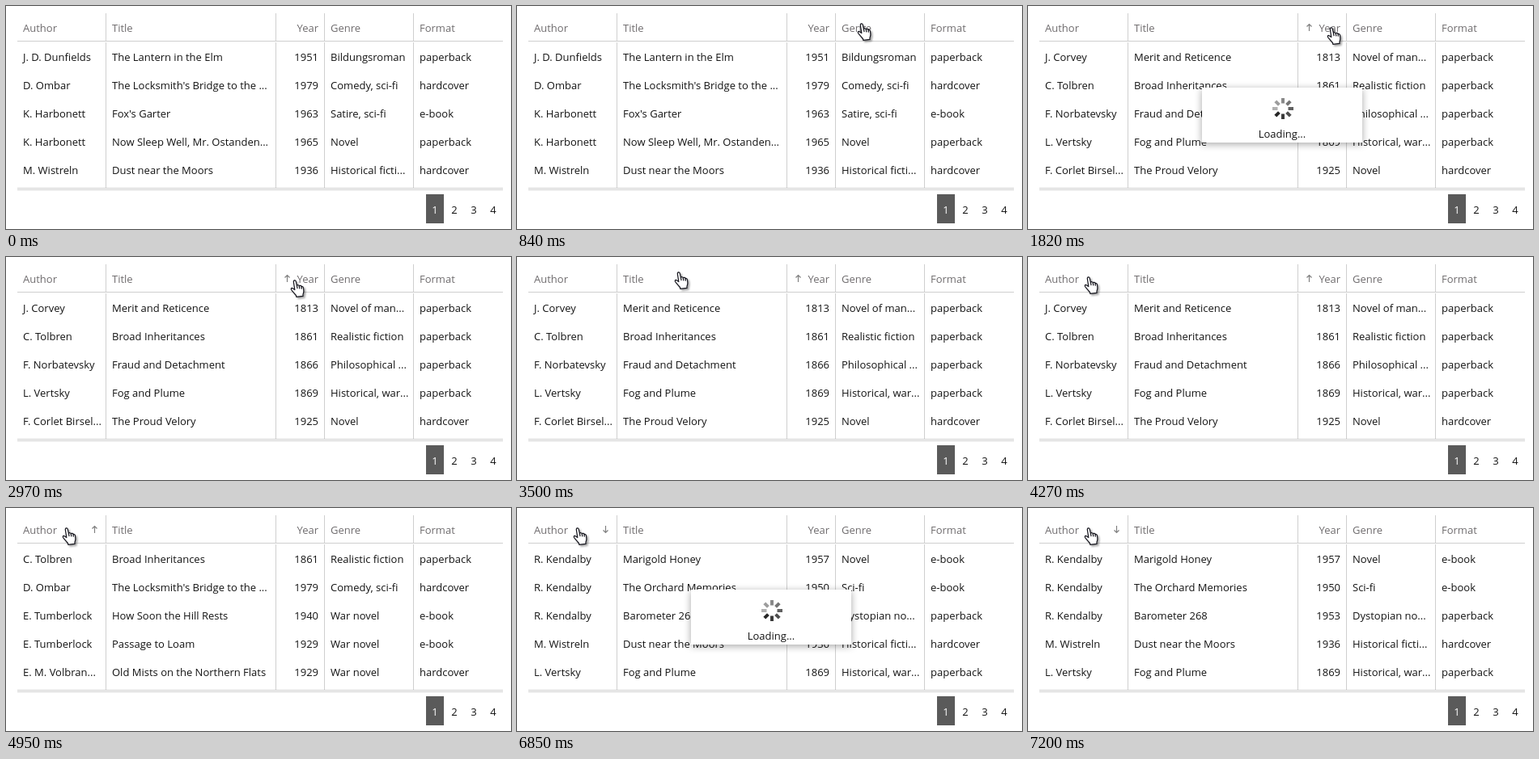
Animation, 624 px wide and 276 px high, one loop 8 s. Source, as an HTML page:

```html
<!DOCTYPE html>
<html lang="en">
<head>
<meta charset="utf-8">
<title>Sortable book grid</title>
<style>
html, body { margin: 0; width: 100%; height: 100%; overflow: hidden; background: #fff; }
svg { display: block; }
text { font: 13px "Open Sans", "Noto Sans", sans-serif; fill: #141414; }
.head text { fill: #6f6c6e; }
.right { text-anchor: end; }
.mid { text-anchor: middle; }
.lines { stroke: #cfcfcf; fill: none; shape-rendering: crispEdges; }
.arrow { stroke: #808080; stroke-width: 1.2; fill: none; }

.page, #loader { animation: 8s step-end infinite; }
.page:nth-child(1) { animation-name: page1; }
.page:nth-child(2) { animation-name: page2; }
.page:nth-child(3) { animation-name: page3; }
.page:nth-child(4) { animation-name: page4; }
@keyframes page1 { 0% { visibility: visible } 22.75%, 100% { visibility: hidden } }
@keyframes page2 { 0% { visibility: hidden } 22.75% { visibility: visible } 58.75%, 100% { visibility: hidden } }
@keyframes page3 { 0% { visibility: hidden } 58.75% { visibility: visible } 85.625%, 100% { visibility: hidden } }
@keyframes page4 { 0% { visibility: hidden } 85.625%, 100% { visibility: visible } }

#loader { animation-name: load; }
#loader rect { filter: drop-shadow(0 2px 5px rgba(0, 0, 0, .35)); }
@keyframes load {
  0% { opacity: 0 }
  22.75% { opacity: 1 }
  24.375% { opacity: .8; animation-timing-function: steps(4) }
  25.875% { opacity: 0 }
  58.75% { opacity: 1 }
  60% { opacity: .83; animation-timing-function: steps(5) }
  61.875% { opacity: 0 }
  85.625% { opacity: 1 }
  88.125% { opacity: .83; animation-timing-function: steps(5) }
  90%, 100% { opacity: 0 }
}

#hand { animation: point 8s step-end infinite; filter: drop-shadow(2px 2px 1px rgba(0, 0, 0, .35)); }
#hand path { stroke: #14141c; stroke-width: 1.3; stroke-linejoin: round; fill: #fff; }
@keyframes point {
  0% { transform: translate(587px, 61px); opacity: 0 }
  8.625% { transform: translate(587px, 61px); opacity: 1; animation-timing-function: steps(5) }
  10.5% { transform: translate(419px, 21px); opacity: 1; animation-timing-function: steps(4) }
  12% { transform: translate(390px, 17px); opacity: 1; animation-timing-function: steps(4) }
  15.25% { transform: translate(368px, 26px); opacity: 1 }
  37.125% { transform: translate(350px, 28px); opacity: 1 }
  37.5% { transform: translate(331px, 29px); opacity: 1 }
  39.5% { transform: translate(322px, 29px); opacity: 1 }
  41.5% { transform: translate(311px, 28px); opacity: 1; animation-timing-function: steps(6) }
  43.75% { transform: translate(193px, 18px); opacity: 1; animation-timing-function: steps(4) }
  45.25% { transform: translate(135px, 13px); opacity: 1; animation-timing-function: steps(6) }
  48.25% { transform: translate(78px, 17px); opacity: 1; animation-timing-function: steps(5) }
  51.375% { transform: translate(60px, 24px); opacity: 1 }
  51.75% { transform: translate(63px, 24px); opacity: 1 }
  52.5% { transform: translate(66px, 24px); opacity: 1 }
  53.375%, 100% { transform: translate(68px, 24px); opacity: 1 }
}
</style>
</head>
<body>
<svg width="624" height="276" viewBox="0 0 624 276">
  <path class="lines" d="M14 43.5H614M14 225.5H614M14 227.5H614"/>
  <path class="lines" id="columns"/>
  <g class="head" id="head"></g>
  <g id="pages"></g>
  <rect x="519" y="233" width="22" height="36" fill="#5a5a5a"/>
  <g id="pager"></g>
  <g id="loader">
    <rect x="215" y="101" width="198" height="68" fill="#fff"/>
    <g id="spinner" transform="translate(315 127)"></g>
    <text class="mid" x="314" y="163">Loading...</text>
  </g>
  <g id="hand">
    <g transform="translate(0 -.3) scale(.92 .95)">
      <path d="M5.8 3.4C5.3 1 8.5.5 9 2.8L10.2 8.2C11 7 13 7.2 13.3 8.6 14.2 7.6 16 8 16.3 9.4 17.4 8.8 18.8 9.6 19 11L19.4 15C19.6 17 18.6 18.6 18.4 20L18.5 21.8 9.6 22.8 9.2 20.8C7.6 19.4 6 17 3.4 14.4 1.6 12.6 2.6 10.8 4.6 11.6L7.4 13.6Z"/>
      <path d="M10.2 8.2 11 12M13.3 8.6 14 12.2M16.3 9.4 16.8 12.6"/>
    </g>
  </g>
</svg>
<script>
const columns = [21, 131, 386, 401, 511];
const pages = [
  { rows: [
    "J. D. Dunfields|The Lantern in the Elm|1951|Bildungsroman|paperback",
    "D. Ombar|The Locksmith's Bridge to the ...|1979|Comedy, sci-fi|hardcover",
    "K. Harbonett|Fox's Garter|1963|Satire, sci-fi|e-book",
    "K. Harbonett|Now Sleep Well, Mr. Ostanden...|1965|Novel|paperback",
    "M. Wistreln|Dust near the Moors|1936|Historical ficti...|hardcover"] },
  { arrow: 347.5, rows: [
    "J. Corvey|Merit and Reticence|1813|Novel of man...|paperback",
    "C. Tolbren|Broad Inheritances|1861|Realistic fiction|paperback",
    "F. Norbatevsky|Fraud and Detachment|1866|Philosophical ...|paperback",
    "L. Vertsky|Fog and Plume|1869|Historical, war...|paperback",
    "F. Corlet Birsel...|The Proud Velory|1925|Novel|hardcover"] },
  { arrow: 109.5, rows: [
    "C. Tolbren|Broad Inheritances|1861|Realistic fiction|paperback",
    "D. Ombar|The Locksmith's Bridge to the ...|1979|Comedy, sci-fi|hardcover",
    "E. Tumberlock|How Soon the Hill Rests|1940|War novel|e-book",
    "E. Tumberlock|Passage to Loam|1929|War novel|e-book",
    "E. M. Volbran...|Old Mists on the Northern Flats|1929|War novel|hardcover"] },
  { arrow: 109.5, down: true, rows: [
    "R. Kendalby|Marigold Honey|1957|Novel|e-book",
    "R. Kendalby|The Orchard Memories|1950|Sci-fi|e-book",
    "R. Kendalby|Barometer 268|1953|Dystopian no...|paperback",
    "M. Wistreln|Dust near the Moors|1936|Historical ficti...|hardcover",
    "L. Vertsky|Fog and Plume|1869|Historical, war...|paperback"] }
];

const fill = (id, html) => { document.getElementById(id).innerHTML = html; };

const row = (line, y) => line.split("|").map((cell, i) =>
  `<text x="${columns[i]}" y="${y}"${i === 2 ? ' class="right"' : ""}>${cell}</text>`).join("");

const arrow = (x, down) =>
  `<path class="arrow" transform="translate(${x} 26.5) scale(1 ${down ? -1 : 1})" d="M0 4.5V-4M-3-1 0-4 3-1"/>`;

const page = ({ rows, arrow: x, down }) =>
  `<g class="page">${rows.map((r, i) => row(r, 68 + 35 * i)).join("")}${x ? arrow(x, down) : ""}</g>`;

fill("head", row("Author|Title|Year|Genre|Format", 32));
fill("pages", pages.map(page).join(""));
fill("pager", [530, 554, 578, 602].map((x, i) =>
  `<text class="mid" x="${x}" y="257"${i ? "" : ' style="fill:#fff"'}>${i + 1}</text>`).join(""));

// Eight spokes, lightest on the left, darkening clockwise.
fill("spinner", Array.from({ length: 8 }, (_, i) =>
  `<path d="M-6.5 0H-13" stroke="#222" stroke-width="4" opacity="${0.35 + 0.09 * i}" transform="rotate(${45 * i})"/>`).join(""));

document.getElementById("columns").setAttribute("d",
  [123.5, 333.5, 393.5, 503.5].map(x => `M${x} 9V43M${x} 45V225`).join(""));
</script>
</body>
</html>
```
